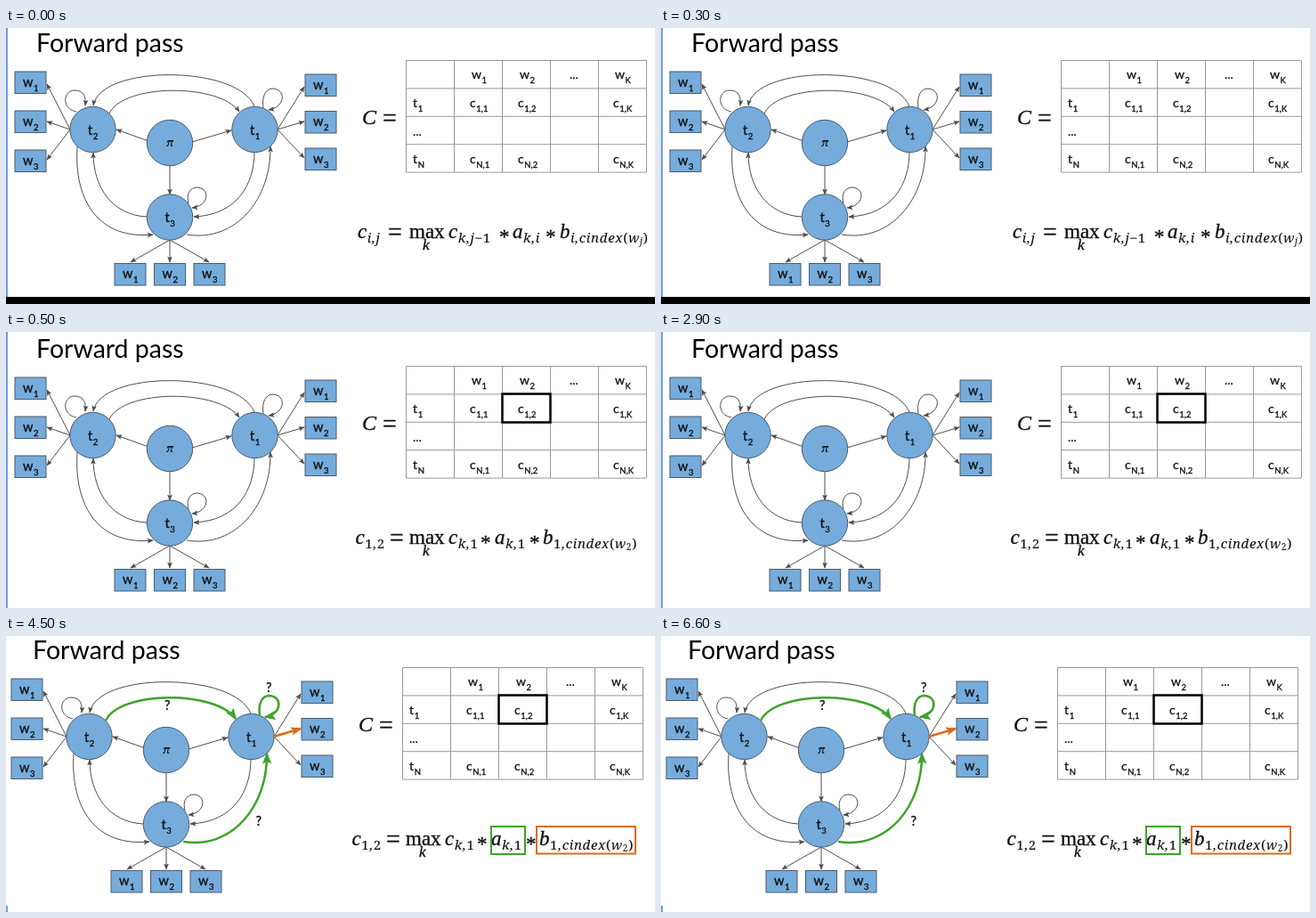
These frames come from a looping animation (729x310 px, 8000 ms). An HTML page:

```html
<!DOCTYPE html>
<html lang="en">
<head>
<meta charset="utf-8">
<title>Forward pass</title>
<style>
  html, body { margin: 0; width: 100%; height: 100%; overflow: hidden; background: #fff; }
  svg { display: block; width: 729px; height: 310px; }
  text { font-family: Lato, sans-serif; fill: #111; white-space: pre; }
  .title { font-size: 28.5px; fill: #000; }
  .label { font-size: 14.5px; stroke: #111; stroke-width: .35px; }
  .cell { font-size: 14px; stroke: #111; stroke-width: .3px; }
  .label .sub, .cell .sub { font-size: 9.5px; }
  .math { font: italic 23px "Liberation Serif", serif; stroke: #111; stroke-width: .35px; }
  .math .sub { font-family: "Noto Serif", serif; font-size: 15px; letter-spacing: .7px; stroke-width: .1px; }
  .math .subsub { font-size: 10px; }
  .up { font-style: normal; }
  .pi { font: italic bold 12.5px "Noto Serif", serif; }
  .node { fill: #76acdc; stroke: #4a5a6a; }
</style>
</head>
<body>
<svg viewBox="0 0 729 310">
  <defs id="heads"></defs>
  <g id="slide"></g>
  <rect id="edge" width="2" fill="#6d9eeb"/>
  <rect id="bar" y="302" width="729" height="8"/>
</svg>
<script>
const $ = id => document.getElementById(id);
const GRAY = "#4d4d4d", GREEN = "#3fa32a", ORANGE = "#d96c1a";

const rect = (x, y, w, h, attrs) =>
  `<rect x="${x}" y="${y}" width="${w}" height="${h}" ${attrs}/>`;
const frame = (x, y, w, h, color, width) =>
  rect(x, y, w, h, `fill="none" stroke="${color}" stroke-width="${width}"`);
const text = (x, y, cls, body, sub = "") =>
  `<text x="${x}" y="${y}" class="${cls}">${body}` +
  (sub && `<tspan class="sub" dx=".6" dy="5">${sub}</tspan>`) + "</text>";
const arrow = (d, color = GRAY, width = 1) =>
  `<path d="${d}" fill="none" stroke="${color}" stroke-width="${width}" marker-end="url(#head${color.slice(1)})"/>`;
const head = (color, size) =>
  `<marker id="head${color.slice(1)}" viewBox="0 0 10 10" refX="9" refY="5" markerWidth="${size}"
    markerHeight="${size}" markerUnits="userSpaceOnUse" orient="auto">
    <path d="M0 1L10 5L0 9L2 5Z" fill="${color}"/></marker>`;

const paths = {
  t1ToT2: "M279 88C260 41 106 41 98 87",
  t2ToT1: "M116 96C132 62 240 62 262 94",
  t1ToT3: "M279 139C279 175 260 210 211 212",
  t3ToT2: "M158 212C120 210 98 180 98 140",
  t2ToT3: "M80 133C76 195 105 238 165 232",
  t3ToT1: "M203 232C258 241 298 192 297 133",
  loop1: "M289 90C287 76 292 68 300 68C315 69 314 89 295 92",
  loop2: "M79 94C62 91 64 70 77 70C88 70 90 78 89 87",
  loop3: "M205 197C202 186 207 179 215 179C230 180 228 200 209 202",
  piToT2: "M160 127L124 114",
  piToT1: "M209 128L253 115",
  piToT3: "M184 155V187",
  t2ToW1: "M72 114L46 63", t2ToW2: "M72 114L46 105", t2ToW3: "M72 114L46 148",
  t1ToW1: "M305 114L335 66", t1ToW2: "M305 114L335 105", t1ToW3: "M305 114L335 146",
  t3ToW1: "M184 238L140 263", t3ToW2: "M184 238V263", t3ToW3: "M184 238L228 263",
};

function diagram() {
  const circle = (x, y) => `<circle cx="${x}" cy="${y}" r="25.7" class="node"/>`;
  const state = (x, y, n) => circle(x, y) + text(x - 5.5, y + 5.5, "label", "t", n);
  const word = (x, y, n) =>
    rect(x, y, 35, 24.5, 'class="node"') + text(x + 9, y + 16.5, "label", "w", n);
  return Object.values(paths).map(d => arrow(d)).join("") +
    state(97.5, 114, 2) + state(279.5, 114, 1) + state(184, 212.5, 3) +
    circle(184, 129) + text(180, 133, "pi", "π") +
    [1, 2, 3].map(n =>
      word(10, 5 + 44 * n, n) +
      word(336, 10.5 + 41.5 * n, n) +
      word(77.5 + 44.5 * n, 264.5, n)).join("");
}

function table() {
  const left = 449.5, top = 36.5, colW = 54, rowH = 31.4;
  let lines = "";
  for (let i = 0; i < 6; i++) lines += `M${left + i * colW} ${top}v${4 * rowH}`;
  for (let i = 0; i < 5; i++) lines += `M${left} ${top + i * rowH}h${5 * colW}`;
  const columns = [[523, 1], [577, 2], [684, "K"]];
  const rows = [[88.5, 1], [152, "N"]];
  return `<path d="${lines}" fill="none" stroke="#999"/>` +
    columns.map(([x, c]) => text(x, 57, "cell", "w", c) +
      rows.map(([y, r]) => text(x - 2, y, "cell", "c", `${r},${c}`)).join("")).join("") +
    rows.map(([y, r]) => text(457, y, "cell", "t", r)).join("") +
    text(633, 57, "cell", "...") + text(457, 121, "cell", "...");
}

// Digits and parentheses stand upright inside italic maths.
const upright = s => s.replace(/[\d()−]+/g, m => `<tspan class="up">${m}</tspan>`);
const math = (x, body, sub = "") => text(x, 236, "math", body, upright(sub));
const equals = (x, y) => `<text x="${x}" y="${y}" class="math up" style="font-size:28px">=</text>`;
const times = x => text(x, 241.5, "math up", "*");

function formula({ c, eq, prev, star1, a, star2, b }) {
  const emission = upright(b[1] + ",cindex(") + "w" +
    `<tspan class="subsub" dy="2">${upright(b[2])}</tspan><tspan class="up" dy="-2">)</tspan>`;
  return math(...c) + equals(eq, 238) + text(453, 236, "math up", "max") +
    `<text x="468" y="249" class="math" style="font-size:17px">k</text>` +
    math(...prev) + times(star1) + math(...a) + times(star2) +
    text(b[0], 236, "math", "b", emission);
}

const general = formula({
  c: [395, "c", "i,j"], eq: 429, prev: [497, "c", "k,j−1"], star1: 554,
  a: [569, "a", "k,i"], star2: 606, b: [622, "i", "j"],
});
const example = formula({
  c: [392.5, "c", "1,2"], eq: 431, prev: [497, "c", "k,1"], star1: 533,
  a: [549, "a", "k,1"], star2: 588, b: [603, "1", "2"],
});

const base = text(34, 27, "title", "Forward pass") + diagram() + table() +
  `<text x="400" y="108" class="math" style="font-size:24px">C</text>` + equals(423, 110);
const chosenCell = frame(557.5, 67.5, 54, 32, "#000", 2.5);
const highlights =
  [paths.t2ToT1, paths.t3ToT1, paths.loop1].map(d => arrow(d, GREEN, 2.5)).join("") +
  arrow(paths.t1ToW2, ORANGE, 2.5) +
  [[182, 84], [296, 64], [284.5, 214]].map(([x, y]) => text(x, y, "label", "?")).join("") +
  frame(549, 215, 38, 31, GREEN, 2) + frame(600, 215, 111, 30.5, ORANGE, 2);

const scenes = [
  { until: 500, shift: [0, 0], body: base + general, edge: [0, 302], bar: true },
  { until: 4500, shift: [0, 2], body: base + chosenCell + example, edge: [0, 310] },
  { until: 8000, shift: [-4, -1], body: base + chosenCell + example + highlights, edge: [303, 7] },
];

$("heads").innerHTML = head(GRAY, 7) + head(GREEN, 13) + head(ORANGE, 12);

let shown;
function draw() {
  const time = performance.now() % 8000;
  const scene = scenes.find(s => time < s.until);
  if (scene !== shown) {
    shown = scene;
    $("slide").innerHTML = scene.body;
    $("slide").setAttribute("transform", `translate(${scene.shift})`);
    $("edge").setAttribute("y", scene.edge[0]);
    $("edge").setAttribute("height", scene.edge[1]);
    $("bar").setAttribute("visibility", scene.bar ? "visible" : "hidden");
  }
  requestAnimationFrame(draw);
}
draw();
</script>
</body>
</html>
```
